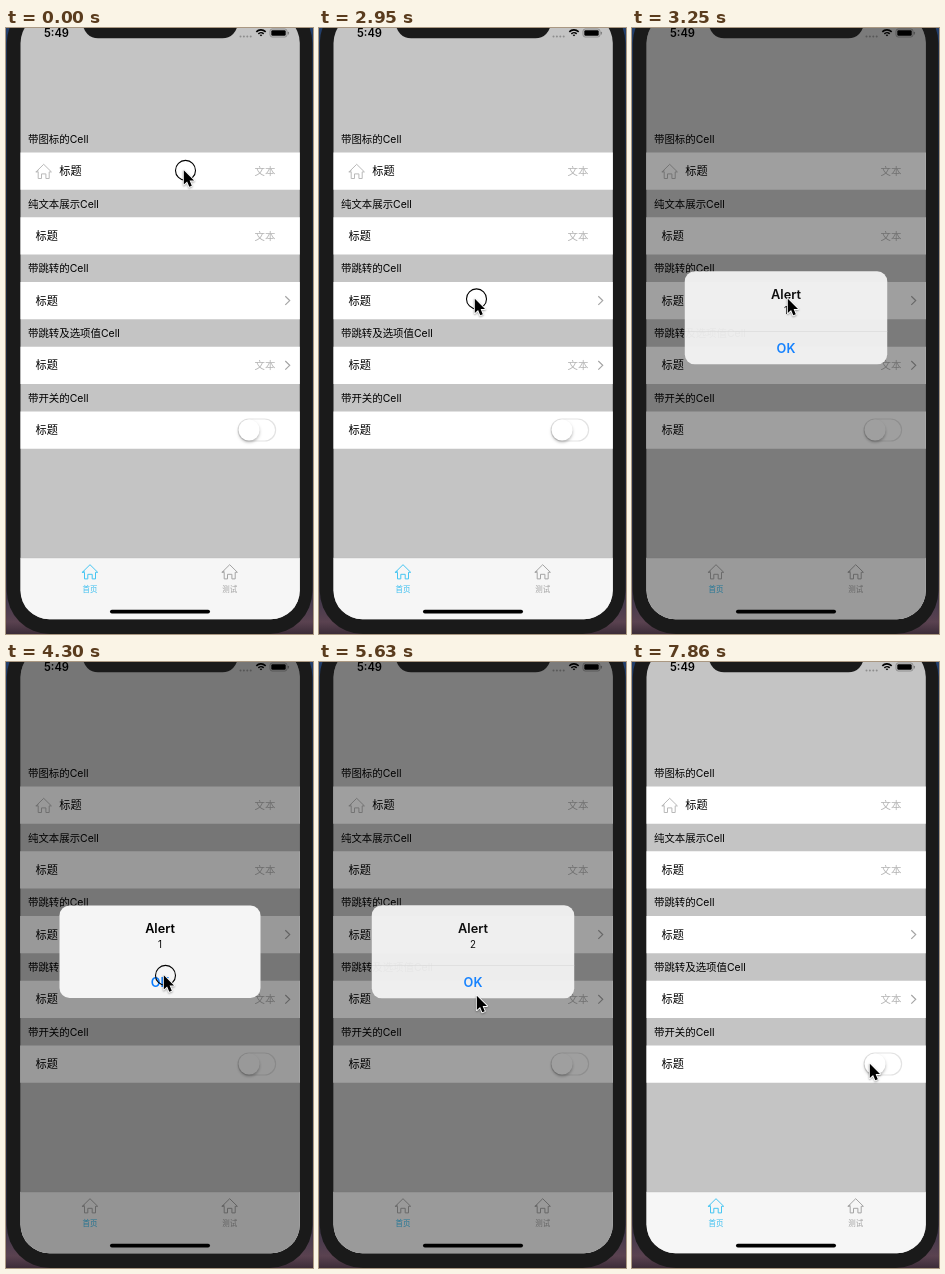
Animation of 307x606 px, one loop 8000 ms. Source, as an HTML page with a canvas:

```html
<!DOCTYPE html>
<html lang="zh-CN">
<head>
<meta charset="utf-8">
<title>Cell</title>
<style>
html, body { margin: 0; width: 100%; height: 100%; overflow: hidden; background: #1a1a1a; }
canvas { display: block; width: 307px; height: 606px; }
</style>
</head>
<body>
<canvas id="stage"></canvas>
<script>
const W = 307, H = 606, LOOP = 8000;
const FONT = 'Inter, "Noto Sans CJK SC", "Noto Sans CJK", sans-serif';
const canvas = document.getElementById('stage');
const ctx = canvas.getContext('2d');
const dpr = window.devicePixelRatio || 1;
canvas.width = W * dpr;
canvas.height = H * dpr;

const POINTER = [
  [3, 177.5, 142], [9, 158, 203], [12, 158, 203], [16, 155.5, 270.5], [22, 155.5, 270.5],
  [26, 157.5, 311], [27, 157.5, 313], [31, 157.5, 313], [34, 157.5, 333.5],
  [39, 157.5, 333.5], [43, 152.5, 320.5], [47, 152.5, 320.5], [53, 237.5, 401.5]
];
const CLICKS = [0, 10, 20, 29, 36, 46];
// [opening click, closing click, message]
const ALERTS = [[20, 29, '1'], [36, 46, '2']];
const RISE = [0, 0.6, 0.94];
const FALL = [1, 1, 0.5, 0.12, 0.02];

const ROWS = [
  { head: '带图标的Cell', icon: true, value: true },
  { head: '纯文本展示Cell', value: true },
  { head: '带跳转的Cell', arrow: true },
  { head: '带跳转及选项值Cell', value: true, arrow: true },
  { head: '带开关的Cell', toggle: true }
];

function stepAt(t) {
  return t < 2944 ? Math.floor(t / 147.2) : 20 + Math.floor((t - 2942) / 149);
}

function pointerAt(n) {
  let a = POINTER[0];
  for (const b of POINTER) {
    if (n <= b[0]) {
      if (b === a) break;
      const u = (n - a[0]) / (b[0] - a[0]);
      const k = u * u * (3 - 2 * u);
      return [a[1] + (b[1] - a[1]) * k, a[2] + (b[2] - a[2]) * k];
    }
    a = b;
  }
  return [a[1], a[2]];
}

function alertAt(n) {
  for (const [open, close, msg] of ALERTS) {
    if (n <= open || n >= close + FALL.length) continue;
    const pressed = n >= close;
    const level = pressed ? FALL[n - close] : RISE[n - open] ?? 1;
    return { level, pressed, msg, scale: pressed ? 1 : 1 + 0.12 * (1 - level) };
  }
  return null;
}

function text(s, x, y, size, color, align = 'left', weight = 400) {
  ctx.font = `${weight} ${size}px ${FONT}`;
  ctx.textAlign = align;
  ctx.fillStyle = color;
  ctx.fillText(s, x, y + size * 0.37);
}

function roundBox(x, y, w, h, r) {
  ctx.beginPath();
  ctx.roundRect(x, y, w, h, r);
}

function fillBox(x, y, w, h, r, color) {
  roundBox(x, y, w, h, r);
  ctx.fillStyle = color;
  ctx.fill();
}

function line(points, color, width = 1) {
  ctx.beginPath();
  points.forEach(([x, y]) => ctx.lineTo(x, y));
  ctx.strokeStyle = color;
  ctx.lineWidth = width;
  ctx.stroke();
}

function house(x, y, color) {
  ctx.save();
  ctx.translate(x, y);
  ctx.lineJoin = ctx.lineCap = 'round';
  line([[-5.5, -0.5], [-7.7, 0.6], [0, -7], [7.7, 0.6], [5.5, 0.6], [5.5, 7.2], [2.2, 7.2],
    [2.2, 2.6], [-2.2, 2.6], [-2.2, 7.2], [-5.5, 7.2], [-5.5, 0.6], [-7.7, 0.6]], color, 1);
  ctx.restore();
}

function toggle(x, y) {
  roundBox(x - 18.5, y - 11, 37.5, 22, 11);
  ctx.strokeStyle = '#e3e3e3';
  ctx.lineWidth = 1.2;
  ctx.stroke();
  ctx.save();
  ctx.shadowColor = 'rgba(0,0,0,.28)';
  ctx.shadowBlur = 3 * dpr;
  ctx.shadowOffsetY = 1.8 * dpr;
  fillBox(x - 18, y - 10.5, 21, 21, 10.5, '#fff');
  ctx.restore();
}

function desktop() {
  const g = ctx.createLinearGradient(0, 0, 0, H);
  g.addColorStop(0, '#233f6c');
  g.addColorStop(0.35, '#182a47');
  g.addColorStop(0.9, '#2b2f47');
  g.addColorStop(0.98, '#5a4250');
  g.addColorStop(1, '#3c2c38');
  ctx.fillStyle = g;
  ctx.fillRect(0, 0, W, H);
  fillBox(0.8, -28, 305.6, 634, 43, '#1a1a1a');
}

function statusBar() {
  text('5:49', 50.5, 5, 11.2, '#000', 'center', 600);
  for (let i = 0; i < 4; i++) fillBox(233.5 + i * 3.4, 7.5, 2, 2, 1, '#8d8d8d');
  ctx.strokeStyle = '#000';
  ctx.lineWidth = 1.6;
  for (const r of [1, 3.6, 6.4]) {
    ctx.beginPath();
    ctx.arc(255, 8.3, r, -Math.PI * 0.76, -Math.PI * 0.24);
    ctx.stroke();
  }
  roundBox(264, 1, 17, 8, 2.2);
  ctx.strokeStyle = '#777';
  ctx.lineWidth = 0.7;
  ctx.stroke();
  fillBox(265.3, 2.3, 14.4, 5.4, 1.2, '#000');
  fillBox(281.8, 3.8, 1, 2.6, 0.5, '#777');
}

function row({ head, icon, value, arrow, toggle: hasToggle }, i) {
  const top = 124.5 + i * 64.75, mid = top + 18.6;
  text(head, 22, top - 13.6, 10.43, '#000');
  ctx.fillStyle = '#fff';
  ctx.fillRect(14, top, 281, 37.25);
  if (icon) house(37.7, mid + 0.2, '#b9b9b9');
  text('标题', icon ? 53.3 : 29.5, mid, 11.17, '#000');
  if (value) text('文本', 269.3, mid, 10.43, '#b4b4b4', 'right');
  if (arrow) line([[279.3, mid - 4.3], [283.7, mid], [279.3, mid + 4.3]], '#a5a5a5', 1.2);
  if (hasToggle) toggle(250.6, mid - 0.1);
}

function tabBar(dimmed) {
  ctx.fillStyle = '#f6f6f6';
  ctx.fillRect(14, 530, 281, 62);
  ctx.fillStyle = '#b8b8b8';
  ctx.fillRect(14, 529.7, 281, 0.5);
  house(84, 543.7, dimmed ? '#a9a9a9' : '#45c5f2');
  text('首页', 84, 561.3, 7.45, '#35bdf0', 'center');
  house(223.7, 543.7, '#a4a4a4');
  text('测试', 223.7, 561.3, 7.45, '#a0a0a0', 'center');
}

function alertBox({ level, scale, pressed, msg }) {
  ctx.fillStyle = `rgba(0,0,0,${0.4 * level})`;
  ctx.fillRect(0, -14, W, H);
  ctx.save();
  ctx.globalAlpha = level;
  ctx.translate(154, 289.8);
  ctx.scale(scale, scale);
  fillBox(-100.5, -46.2, 201, 92.4, 10, '#f5f5f5');
  text('Alert', 0, -23.8, 12.66, '#000', 'center', 600);
  text(msg, 0, -7.8, 9.68, '#000', 'center');
  if (!pressed) {
    ctx.fillStyle = '#d9d9d9';
    ctx.fillRect(-100.5, 13.3, 201, 0.7);
  }
  text('OK', 0, 30.4, 12.66, '#087bff', 'center', 600);
  ctx.restore();
}

function pointer(x, y, clicked) {
  if (clicked) {
    ctx.beginPath();
    ctx.arc(x + 2, y + 0.4, 10, 0, Math.PI * 2);
    ctx.strokeStyle = '#000';
    ctx.lineWidth = 1.1;
    ctx.stroke();
  }
  const shape = new Path2D('M0 0V14.2L3.3 11.1L5.5 16.5L8 15.4L5.8 10.2H10.2Z');
  ctx.save();
  ctx.translate(x + 0.3, y + 0.3);
  ctx.lineJoin = 'round';
  ctx.shadowColor = 'rgba(0,0,0,.35)';
  ctx.shadowBlur = 2 * dpr;
  ctx.shadowOffsetY = dpr;
  ctx.strokeStyle = '#fff';
  ctx.lineWidth = 1.8;
  ctx.stroke(shape);
  ctx.shadowColor = 'transparent';
  ctx.fillStyle = '#000';
  ctx.fill(shape);
  ctx.restore();
}

function draw(t) {
  const n = Math.min(53, stepAt(t));
  const alert = alertAt(n);
  ctx.setTransform(dpr, 0, 0, dpr, 0, 0);
  desktop();
  ctx.save();
  roundBox(14.5, -14, 279.3, 605.3, 29);
  ctx.clip();
  ctx.fillStyle = '#c4c4c4';
  ctx.fillRect(14, -14, 281, H);
  statusBar();
  ROWS.forEach(row);
  tabBar(alert && alert.level > 0.3);
  if (alert) alertBox(alert);
  fillBox(104, 581.7, 100, 3.8, 1.9, '#000');
  fillBox(77, -20, 154.5, 30.3, 15, '#1a1a1a');
  ctx.restore();
  pointer(...pointerAt(n), CLICKS.includes(n));
}

function tick() {
  draw(performance.now() % LOOP);
  requestAnimationFrame(tick);
}
tick();
</script>
</body>
</html>
```
